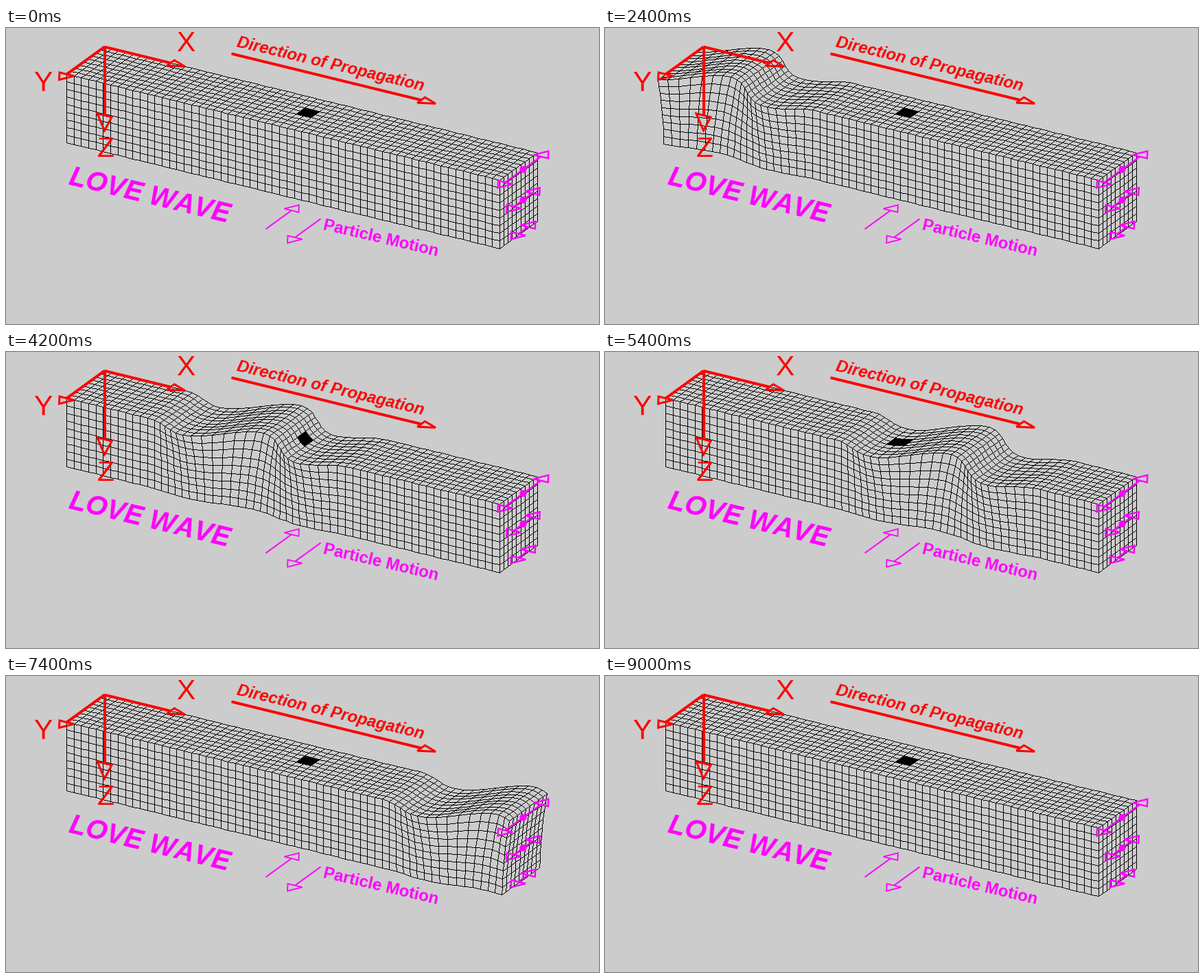
Write a matplotlib script that moves like this. It is 864 by 432 pixels and loops after 10000 ms.

```python
import numpy as np
import matplotlib.pyplot as plt
from matplotlib.animation import FuncAnimation

WIDTH, HEIGHT, DPI = 864, 432, 100
PX = 72 / DPI
RED, MAGENTA = "#ff0000", "#ff00ff"

# Block: projected origin, edge vectors and cell counts
ORIGIN = np.array([143, 27])
X_EDGE = np.array([631, 154.5])
Y_EDGE = np.array([-55, 40])
Z_EDGE = np.array([0, 100])
NX, NY, NZ = 59, 9, 9

AMPLITUDE, WAVELENGTH, HALF_WIDTH, DECAY = 0.365, 0.30, 0.25, 1.5
CELLS_PER_STEP, START_CELL = 2, -17.2
MOVING_STEPS, FRAMES, INTERVAL = 45, 50, 200


def wave_center(step):
    return (START_CELL + CELLS_PER_STEP * step) / NX


def displacement(x, z, center):
    """Sideways shift of the wave packet, as a fraction of the block width."""
    d = x - center
    packet = np.cos(2 * np.pi * d / WAVELENGTH) * np.cos(np.pi * d / (2 * HALF_WIDTH))
    packet = np.where(np.abs(d) < HALF_WIDTH, packet, 0)
    return -AMPLITUDE * packet * np.exp(-DECAY * z)


def project(x, y, z, center):
    x, y, z = np.broadcast_arrays(x, y, z)
    y = y + displacement(x, z, center)
    return ORIGIN + x[..., None] * X_EDGE + y[..., None] * Y_EDGE + z[..., None] * Z_EDGE


def grid_segments(center):
    xs, ys, zs = (np.linspace(0, 1, n + 1) for n in (NX, NY, NZ))
    faces = (project(xs[:, None], ys, 0.0, center),
             project(xs[:, None], 1.0, zs, center),
             project(1.0, ys[:, None], zs, center))
    starts, ends = [], []
    for face in faces:
        for lines in (face, face.transpose(1, 0, 2)):
            starts.append(lines[:, :-1].reshape(-1, 2))
            ends.append(lines[:, 1:].reshape(-1, 2))
    return np.concatenate(starts), np.concatenate(ends)


def grid_image(center):
    """Crisp one-pixel lines, stepped along the longer side of each segment."""
    start, end = (np.floor(p + 0.5) for p in grid_segments(center))
    steps = np.maximum(np.abs(end - start).max(axis=1), 1)
    t = np.minimum(np.arange(steps.max() + 1) / steps[:, None], 1)[..., None]
    points = np.floor(start[:, None] + (end - start)[:, None] * t + 0.5).astype(int)
    image = np.zeros((HEIGHT, WIDTH, 4), np.uint8)
    image[points[..., 1], points[..., 0], 3] = 255
    return image


def patch_outline(center):
    """Two by two cells around node (30, 4) of the top face."""
    angle = np.arange(8) * np.pi / 4
    x = (30 + np.rint(np.cos(angle))) / NX
    y = (4 + np.rint(np.sin(angle))) / NY
    return project(x, y, 0.0, center)


plt.rcParams["text.kerning_factor"] = 6
fig = plt.figure(figsize=(WIDTH / DPI, HEIGHT / DPI), dpi=DPI, facecolor="#cccccc")
ax = fig.add_axes([0, 0, 1, 1])
ax.axis("off")
extent = (-0.5, WIDTH - 0.5, HEIGHT - 0.5, -0.5)
grid = ax.imshow(grid_image(-1), extent=extent, aspect="auto",
                 interpolation="nearest", zorder=1)
patch = ax.add_patch(plt.Polygon(patch_outline(-1), facecolor="black",
                                 edgecolor="black", lw=PX, zorder=2))

# Half the base of an arrow head; its length is twice the unit it points along
UNIT_X, UNIT_Y, UNIT_Z = X_EDGE / 60, Y_EDGE / 10, Z_EDGE / NZ


def arrow(start, shaft, along, across, color, width, head_width):
    """Shaft with an open triangular head lying in a plane of the block."""
    start = np.asarray(start)
    base = start + shaft
    ax.plot(*zip(start, base), color=color, lw=width * PX,
            solid_capstyle="butt", zorder=3)
    ax.add_patch(plt.Polygon([base - across, base + across, base + 2 * along],
                             fill=False, edgecolor=color, lw=head_width * PX, zorder=3))


def label(x, y, text, size, color, angle=0, **font):
    ax.text(x, y, text, color=color, fontsize=size * PX, family="Liberation Sans",
            rotation=-angle, rotation_mode="anchor", ha="left", va="baseline",
            zorder=4, **font)


# Axes, each nine cells long, and the propagation arrow
red_style = dict(color=RED, width=4, head_width=3)
arrow(ORIGIN, X_EDGE * 9 / NX, UNIT_X, UNIT_Y, **red_style)
arrow(ORIGIN, Y_EDGE, UNIT_Y, UNIT_X, **red_style)
arrow(ORIGIN, Z_EDGE, UNIT_Z, UNIT_X, **red_style)
arrow((328, 37), X_EDGE * 0.438, UNIT_X, UNIT_Y, **red_style)

# Particle motion: a pair in front, and three on the end face shrinking with depth
for sign, start in ((-1, (378, 293)), (1, (458, 278))):
    arrow(start, sign * 0.68 * Y_EDGE, sign * UNIT_Y, UNIT_X, MAGENTA, 2, 1.8)
for row in (0, 4, 8):
    middle = np.array([753, 206]) + row * Z_EDGE / NZ
    reach = 0.47 * np.exp(-DECAY * row / NZ)
    for sign in (-1, 1):
        arrow(middle, sign * reach * Y_EDGE, sign * UNIT_Y, UNIT_X, MAGENTA, 2.4, 2.4)
    if row < 8:
        ax.add_patch(plt.Circle(middle, 5, color=MAGENTA, lw=0, zorder=3))

label(248, 33, "X", 41, RED)
label(40, 91, "Y", 41, RED)
label(132, 188, "Z", 41, RED)
label(334.5, 26.5, "Direction of Propagation", 24, RED, 13.4, weight="bold", style="italic")
label(89, 228, "LOVE WAVE", 40, MAGENTA, 13.6, weight="bold", style="italic")
label(460.5, 293, "Particle Motion", 24, MAGENTA, 13.2, weight="bold")


def update(frame):
    center = wave_center(min(frame, MOVING_STEPS))
    grid.set_data(grid_image(center))
    patch.set_xy(patch_outline(center))
    return grid, patch


anim = FuncAnimation(fig, update, frames=FRAMES, interval=INTERVAL,
                     repeat=True, repeat_delay=0)
plt.show()
```
